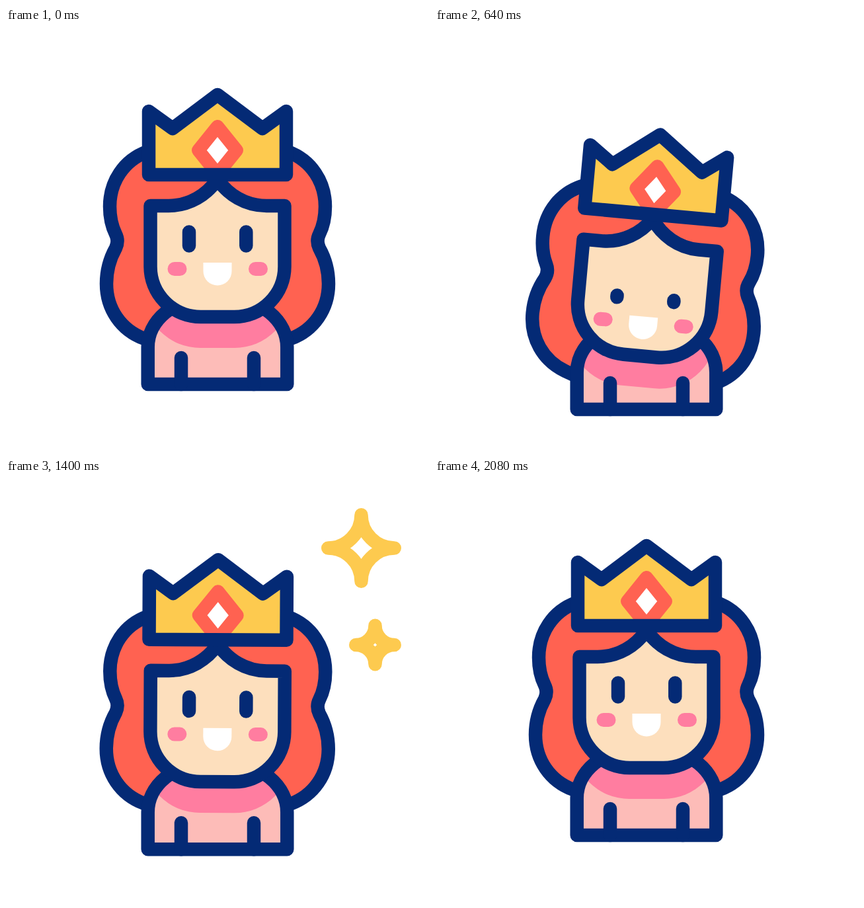
Write an HTML page that moves like this. It is 640 px wide and 640 px high and loops after 2400 ms.

```html
<!DOCTYPE html>
<html>
<head>
<meta charset="utf-8">
<style>
html, body { margin: 0; width: 100%; height: 100%; overflow: hidden; background: #fff; }
svg { display: block; width: 100vw; height: 100vh; }
.line { stroke: #042a75; stroke-width: 20.5; stroke-linecap: round; stroke-linejoin: round; }
.star { fill: none; stroke: #fdca4f; stroke-width: 20.5; stroke-linejoin: round; }
</style>
</head>
<body>
<svg viewBox="0 0 640 640">
  <defs>
    <path id="torso" d="M214.7 539V483a90 74 0 0 1 90-74h30.6a90 74 0 0 1 90 74V539z"/>
    <clipPath id="torsoClip"><use href="#torso"/></clipPath>
    <path id="crown" d="M216 126V222H424V126L388 152L320 101L252 152z"/>
  </defs>

  <g class="head">
    <path id="hair" class="line" fill="#ff6251" d="M330 187H214C178 200 157 233 157 270C157 286 160 300 166 312Q171 322 166 333C157 349 152 367 152 387C152 425 174 457 209 470L240 481H330"/>
    <use href="#hair" transform="matrix(-1 0 0 1 640 0)"/>
  </g>

  <g id="body">
    <use href="#torso" fill="#fdbcb8"/>
    <g clip-path="url(#torsoClip)">
      <path id="shadow" fill="#ff7da0" d="M208 300V398a86 86 0 0 0 86 86h52a86 86 0 0 0 86-86V300z"/>
    </g>
    <use href="#torso" class="line" fill="none"/>
    <path class="line" d="M265 499v40M375 499v40"/>
  </g>

  <g class="head">
    <path class="line" fill="#fddfbd" d="M218.5 269V361a76 76 0 0 0 76 76h51a76 76 0 0 0 76-76V269H394C362 269 336 252 320 229C304 252 278 269 246 269z"/>
    <g id="face">
      <path d="M255 364.5h8M377.5 364.5h8" stroke="#ff7da0" stroke-width="21" stroke-linecap="round"/>
      <path fill="#fff" d="M298.5 355h43v13a21.5 21.5 0 0 1-43 0z"/>
      <path id="eyes" class="line"/>
    </g>
    <use href="#crown" fill="#fdca4f"/>
    <path fill="#fff" stroke="#ff6251" stroke-width="20" stroke-linejoin="round" d="M320 149l29 36l-29 36l-29-36z"/>
    <use href="#crown" class="line" fill="none"/>
  </g>

  <path class="star" transform="translate(537.5 104.5)"/>
  <path class="star" transform="translate(558.5 251)"/>
</svg>
<script>
const LOOP = 2400;
const $ = id => document.getElementById(id);
const heads = document.querySelectorAll('.head');
const [bigStar, smallStar] = document.querySelectorAll('.star');

function ease(u) {
  u = Math.min(Math.max(u, 0), 1);
  return u * u * (3 - 2 * u);
}

// 1 at the middle, easing to 0 at the given distance on both sides.
const bump = (t, mid, reach) => 1 - ease(Math.abs(t - mid) / reach);

// Rest, down, up, down, rest: an eased move between each pair of times.
function swing(t, times, peaks) {
  const stops = [0, ...peaks, 0];
  return times.slice(1).reduce((value, end, i) => {
    const u = (t - times[i]) / (end - times[i]);
    return value + (stops[i + 1] - stops[i]) * ease(u);
  }, 0);
}

// Four points joined by inward quarter circles.
function starPath(r) {
  const arc = (x, y) => `A${r} ${r} 0 0 0 ${x} ${y}`;
  return `M0 ${-r}${arc(r, 0)}${arc(0, r)}${arc(-r, 0)}${arc(0, -r)}z`;
}

// Grows, twinkles once, then fades away.
function twinkle(star, age, radius, life) {
  const alpha = ease(age / 120) * ease((life - age) / 160);
  const size = radius * ease(age / 170) * (1 - 0.27 * bump(age, 270, 136));
  star.setAttribute('opacity', alpha);
  star.setAttribute('d', alpha > 0 ? starPath(size) : '');
}

function draw(t) {
  const bodyY = swing(t, [220, 600, 1030, 1484, 1930], [40, -38, 27]);
  const headY = swing(t, [220, 625, 1085, 1500, 1966], [60, -61, 35]);
  const tilt = swing(t, [310, 645, 1110, 1575, 1940], [5.2, -7, 3.6]);
  const faceY = swing(t, [370, 740, 1120, 1720, 1980], [27, -15.5, 20]);
  const turn = `rotate(${tilt} 320 331)`;

  $('body').setAttribute('transform', `translate(0 ${bodyY})`);
  $('shadow').setAttribute('transform', `translate(0 ${headY - bodyY}) ${turn}`);
  heads.forEach(g => g.setAttribute('transform', `translate(0 ${headY}) ${turn}`));
  $('face').setAttribute('transform', `translate(0 ${faceY})`);

  const blink = bump(t, 610, 250) + bump(t, 1660, 250);
  const lid = -21 * (1 - 0.9 * blink);
  $('eyes').setAttribute('d', `M277 329.5v${lid}M363.3 329.5v${lid}`);

  twinkle(bigStar, t - 1040, 54, 830);
  twinkle(smallStar, t - 1130, 40, 600);
}

const start = performance.now();
function tick() {
  draw((performance.now() - start) % LOOP);
  requestAnimationFrame(tick);
}
tick();
</script>
</body>
</html>
```
